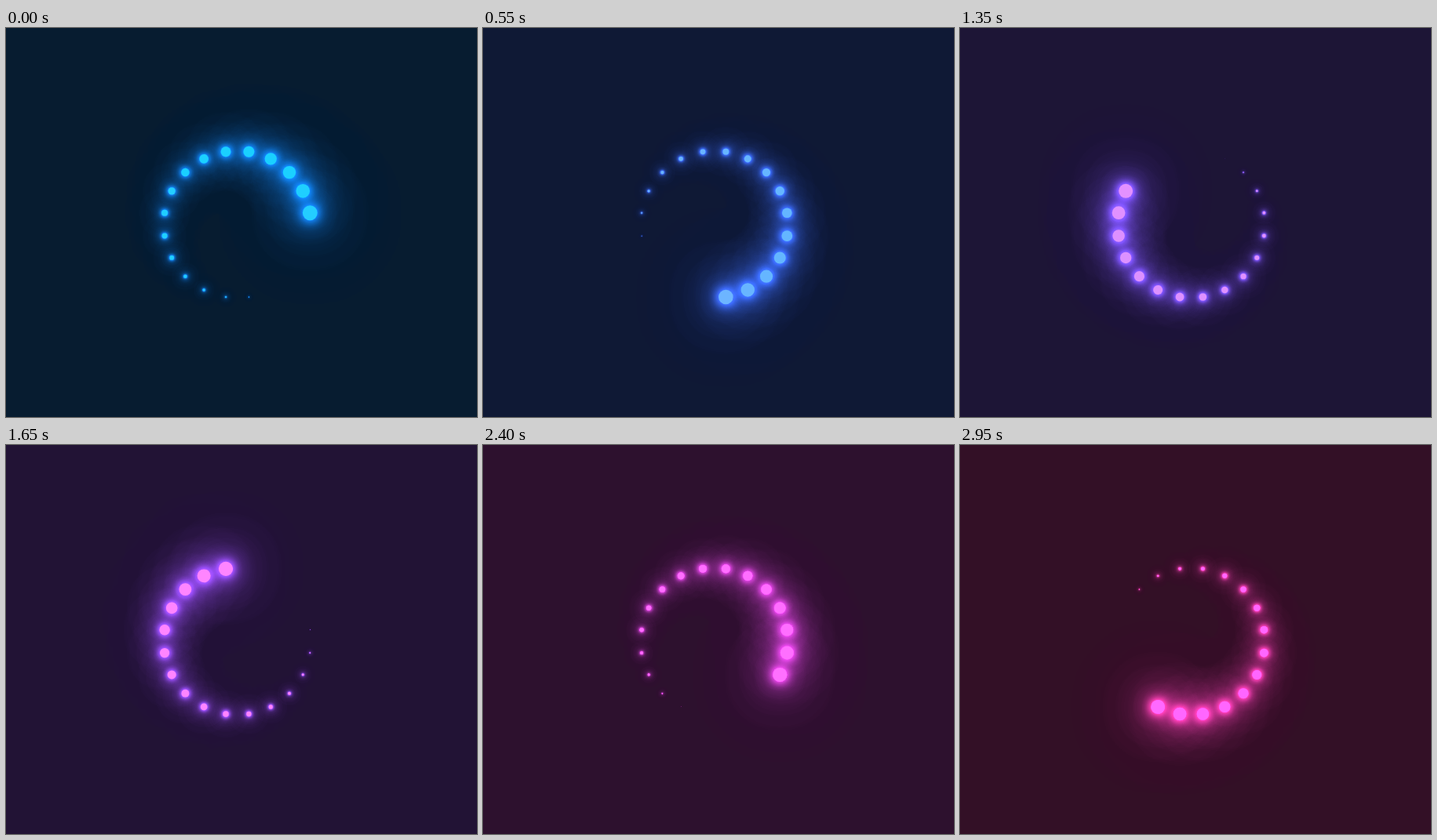
Animation of 600 by 496 pixels, one loop 3000 ms. Source, as an HTML page:

```html
<!DOCTYPE html>
<html lang="en">
<head>
<meta charset="utf-8">
<title>Glowing ring loader</title>
<style>
  html, body {
    margin: 0;
    width: 100%;
    height: 100%;
    overflow: hidden;
    background: #042104;
  }
  #scene {
    position: fixed;
    inset: 0;
    overflow: hidden;
    background: #042104;
  }
  .dot {
    position: absolute;
    left: -7.5px;
    top: -7.5px;
    width: 15px;
    height: 15px;
    border-radius: 50%;
    background: #00ff0a;
    box-shadow: 0 0 10px #00ff0a, 0 0 20px #00ff0a, 0 0 40px #00ff0a,
                0 0 60px #00ff0a, 0 0 80px #00ff0a, 0 0 100px #00ff0a;
  }
</style>
</head>
<body>
<div id="scene"></div>
<script>
const LOOP = 3000;            // ms
const TICK = 50;              // ms per picture
const START = 2.713;          // ring clock at the start of the loop, s
const TICK_ADVANCE = 0.0471;  // ring clock per picture, s

const COUNT = 20;
const CENTER = { x: 294.2, y: 249.9 };
const RADIUS = 93.75;
const ZOOM = 1.263;
const DOT_PERIOD = 2;         // s
const SHRINK_TIME = 1.6;      // s
const HUE_SPEED = 36;         // degrees per s

const scene = document.getElementById('scene');

const dots = Array.from({ length: COUNT }, (_, i) => {
  const angle = (18 * i - 45) * Math.PI / 180;
  const el = document.createElement('div');
  el.className = 'dot';
  scene.appendChild(el);
  return {
    el,
    delay: i * DOT_PERIOD / COUNT,
    x: CENTER.x + RADIUS * Math.sin(angle),
    y: CENTER.y - RADIUS * Math.cos(angle)
  };
});

function render(ms) {
  let tick = Math.floor((ms % LOOP) / TICK);
  if (tick === 1 || tick === 12) tick--;  // two pictures are held twice as long
  const clock = START + tick * TICK_ADVANCE;

  scene.style.filter = `hue-rotate(${HUE_SPEED * clock}deg)`;
  for (const { el, delay, x, y } of dots) {
    const age = (clock - delay + DOT_PERIOD) % DOT_PERIOD;
    const scale = ZOOM * Math.max(0, 1 - age / SHRINK_TIME);
    el.style.transform = `translate(${x}px, ${y}px) scale(${scale})`;
  }
}

const origin = performance.now();
function frame() {
  render(performance.now() - origin);
  requestAnimationFrame(frame);
}
render(0);
requestAnimationFrame(frame);
</script>
</body>
</html>
```
